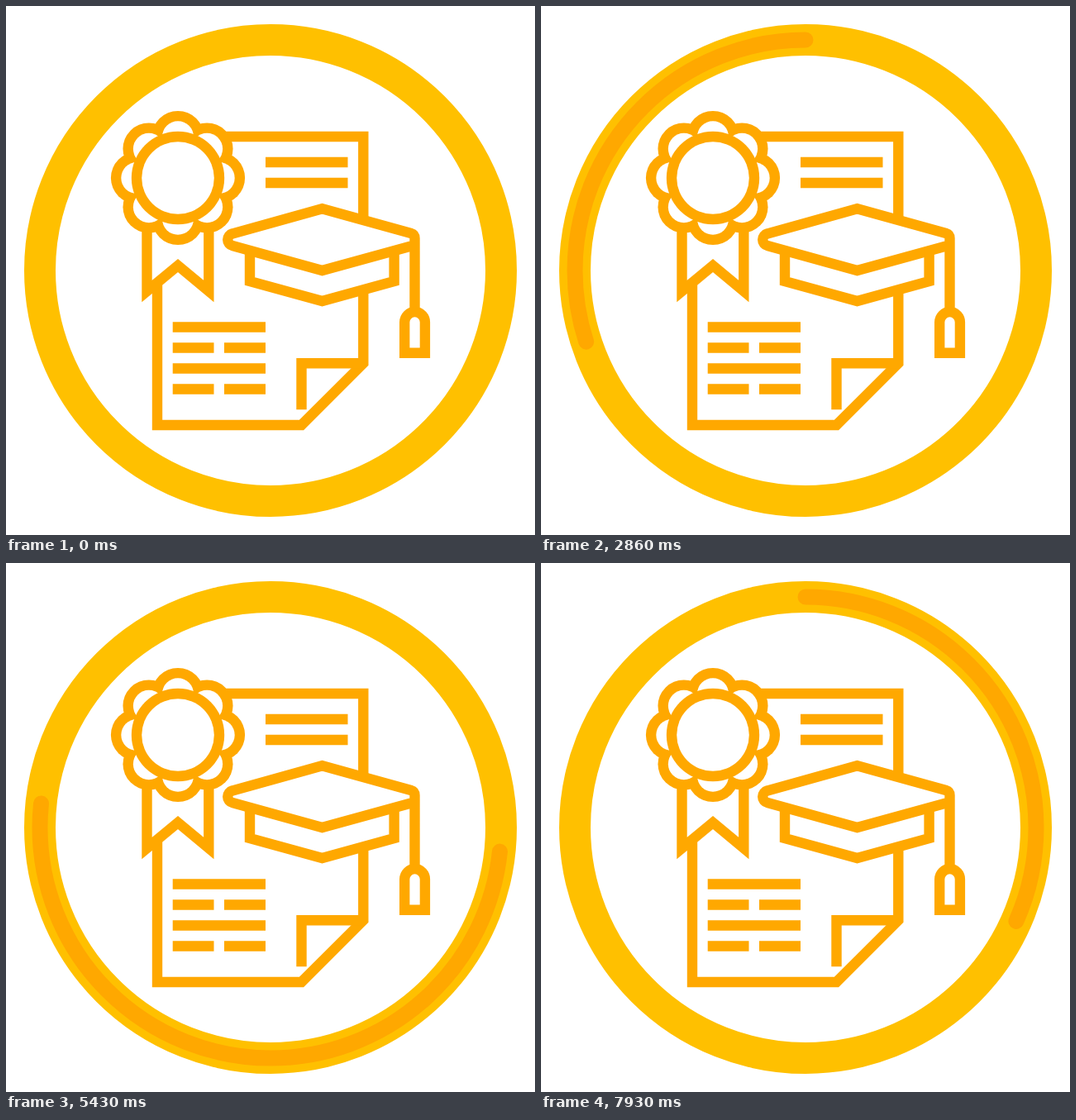
An HTML page for the animation above (8000 ms loop, 640 by 640 pixels).

```html
<!DOCTYPE html>
<html lang="en">
<head>
<meta charset="utf-8">
<title>Graduation loader</title>
<style>
  html, body { margin: 0; width: 100%; height: 100%; overflow: hidden; background: #fff; }
  svg { display: block; width: 100vw; height: 100vh; }
  .ring { fill: none; stroke: #ffc000; stroke-width: 38; }
  .sweep { fill: none; stroke: #ffa800; stroke-width: 19; stroke-linecap: round; }
  .icon { fill: none; stroke: #ffa800; stroke-width: 12.4; stroke-miterlimit: 10; }
  .rim { fill: #ffa800; stroke: none; }
  .hole { fill: #fff; stroke: none; }
</style>
</head>
<body>
<svg viewBox="0 0 640 640">
  <circle class="ring" cx="320" cy="320" r="279"/>
  <circle class="sweep" id="sweep" cx="320" cy="320" r="279" pathLength="360"
          transform="rotate(-90 320 320)" visibility="hidden"/>
  <g class="icon">
    <!-- document -->
    <path d="M260 158H432.3V258M432.3 344V432.3L357.5 507H183V335"/>
    <path d="M357.5 488.3V432.3H432.3"/>
    <path d="M314 189H413.5M314 214H413.5"/>
    <path d="M201.700 388.500H314M201.700 413.500H251.500M264 413.500H314M201.700 438.500H314M201.700 463.500H251.500M264 463.500H314"/>
    <!-- rosette -->
    <path d="M170.500 262V345L208 314L245.300 345V262"/>
    <g id="rosette" transform="translate(208 208)"></g>
    <!-- cap and tassel -->
    <path d="M494.500 289.300L382.500 320L274 290A7.500 7.500 0 0 1 274 275.400L382.500 245.300L490 274.900Q494.500 276.200 494.500 281V368"/>
    <path d="M295 294V333L382.500 357L469.600 333V294"/>
    <path d="M482.200 419.700V382.500A12.350 12.350 0 0 1 506.900 382.500V419.700Z"/>
  </g>
</svg>
<script>
  const LOOP = 8000, STEPS_PER_MS = 14 / 1000;
  const TICKS_PER_STEP = 25 / 14, CYCLE = 90, TAIL_DELAY = 30, TURN = 60;

  const rosette = document.getElementById('rosette');
  const sweep = document.getElementById('sweep');

  function addCircle(cx, cy, r, className) {
    const circle = document.createElementNS('http://www.w3.org/2000/svg', 'circle');
    const attrs = { cx, cy, r, class: className };
    for (const name in attrs) circle.setAttribute(name, attrs[name]);
    rosette.append(circle);
  }

  function addPetals(r, className) {
    for (let i = 0; i < 8; i++) {
      const a = i * Math.PI / 4;
      addCircle(49.7 * Math.cos(a), 49.7 * Math.sin(a), r, className);
    }
  }

  addPetals(31.4, 'rim');
  addPetals(19, 'hole');
  addCircle(0, 0, 56.2, 'rim');
  addCircle(0, 0, 43.8, 'hole');

  const clamp = (v, lo, hi) => Math.min(hi, Math.max(lo, v));
  const angle = ticks => clamp(ticks / TURN, 0, 1) * 360;

  // Both ends turn at the same speed; the tail leaves later than the head.
  function draw(ms) {
    const centis = Math.floor((ms % LOOP) / 10);
    const step = Math.floor((centis * 10 + 5) * STEPS_PER_MS);
    const tick = Math.ceil(step * TICKS_PER_STEP - 1e-6) % CYCLE;
    const head = angle(tick), tail = angle(tick - TAIL_DELAY);
    sweep.setAttribute('visibility', head > tail ? 'visible' : 'hidden');
    sweep.setAttribute('stroke-dasharray', `${head - tail} 720`);
    sweep.setAttribute('stroke-dashoffset', -tail);
  }

  const start = performance.now();
  function loop() {
    draw(performance.now() - start);
    requestAnimationFrame(loop);
  }
  loop();
</script>
</body>
</html>
```
